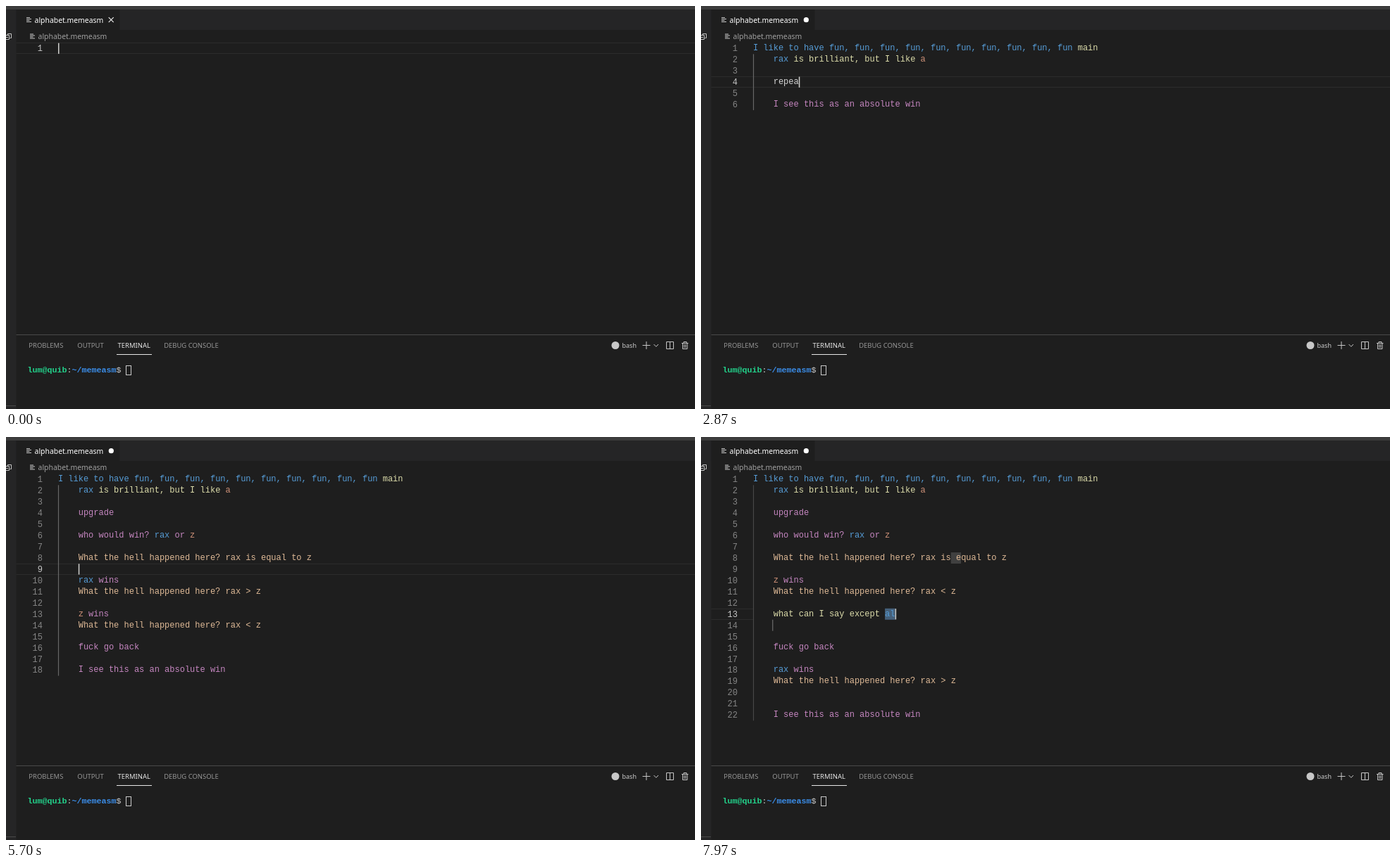
Animation of 978 by 573 pixels, one loop 8 s. Source, as an HTML page:

```html
<!DOCTYPE html>
<html lang="en">
<head>
<meta charset="utf-8">
<title>alphabet.memeasm</title>
<style>
html, body { margin: 0; width: 100%; height: 100%; overflow: hidden; background: #1e1e1e; }
svg { display: block; width: 978px; height: 573px; }
text { white-space: pre; }
.ui { font-family: "Noto Sans", "Open Sans", sans-serif; }
.mono { font-family: "Liberation Mono", monospace; font-size: 12px; }
.tab { font-size: 9.45px; fill: #969696; }
.ico { fill: none; stroke: #c5c5c5; stroke-width: 1; }
</style>
</head>
<body>
<svg viewBox="0 0 978 573">
  <rect width="978" height="573" fill="#1e1e1e"/>
  <rect width="14.5" height="573" fill="#252526"/>
  <rect x="14.5" y="5" width="964" height="29" fill="#252526"/>
  <rect x="14.5" y="5" width="147" height="29" fill="#1e1e1e"/>
  <rect width="978" height="5" fill="#3c3c3c"/>
  <path d="M0 568.5H14" stroke="#4a4a4a"/>
  <path class="ico" d="M2.5 41V39.5H7.5V45.5H5.5M-1 41.5H4.5V47.5H-1M0 44.5H3"/>
  <path id="list" class="ico" d="M29 16.5H34M29 18.5H36M29 20.5H33.5M29 22.5H36"/>
  <use href="#list" x="5" y="23.5"/>
  <g class="ui">
    <text x="40.6" y="23.5" font-size="10.4" fill="#fff">alphabet.memeasm</text>
    <text x="45.6" y="47.4" font-size="10.4" fill="#a0a0a0">alphabet.memeasm</text>
  </g>
  <path id="cross" d="M145.7 16.2L152.7 23.2M152.7 16.2L145.7 23.2" stroke="#e8e8e8" stroke-width="1.2"/>
  <circle id="dot" cx="149.3" cy="19.7" r="3.6" fill="#fff"/>
  <g id="editor" class="mono"></g>
  <path d="M14.5 467.5H978" stroke="#4a4a4a"/>
  <g class="ui tab">
    <text x="32.3" y="485.5">PROBLEMS</text>
    <text x="101.3" y="485.5">OUTPUT</text>
    <text x="158.6" y="485.5" fill="#e7e7e7">TERMINAL</text>
    <text x="224.2" y="485.5">DEBUG CONSOLE</text>
    <text x="874.5" y="485.8" font-size="9" fill="#ccc">bash</text>
  </g>
  <path d="M157 495.5H207" stroke="#e7e7e7"/>
  <circle cx="865" cy="482.5" r="5.5" fill="#c8c8c8"/>
  <path class="ico" d="M909 477V488M903.5 482.5H914.5M919.5 481L922.8 484.3L926 481M937.5 477.5H947.5V487.5H937.5ZM942.5 477.5V487.5"/>
  <path class="ico" d="M959 479.5H968.5M962 479V477.5H966V479M960.5 480V487.5H967V480M962.7 481V486M964.8 481V486"/>
  <text class="mono" y="521.3" style="font-size:11.68px" fill="#ccc"><tspan x="30.5" font-weight="bold" fill="#23d18b">lum@quib</tspan>:<tspan font-weight="bold" fill="#3b8eea">~/memeasm</tspan>$</text>
  <rect x="170.5" y="511.5" width="7" height="13" fill="none" stroke="#ccc"/>
</svg>
<script>
const LOOP = 8000, W = 7.2, H = 15.95;
const X = col => 73.9 + col * W;
const Y = row => 52.4 + (row - 1) * H;
const PAD = '    ';

const COMMANDS = [
  ['Define function', 'I like to have fun'],
  ['Move value', 'is brilliant, but I like'],
  ['Repeat forever', 'upgrade'],
  ['Compare registers', 'who would win'],
  ['Print character', 'what can I say except'],
  ['Add registers', 'units are ready'],
  ['Push to stack', 'stonks'],
  ['Pop from stack', 'not stonks'],
  ['Increment', 'upvote'],
  ['Decrement', 'downvote'],
  ['Comment', 'What the hell happened here?']
];

const TOKENS = [
  ['#deb996', 'What the hell.*'],
  ['#569cd6', 'I like to have[a-z, ]*fun|\\b(?:rax|al)\\b'],
  ['#dcdcaa', '\\bis brilliant, but I like|what can I say except|\\b(?:main?|name)$'],
  ['#c586c0', 'I see this as an absolute win|upgrade|fuck go back|who would win\\?|\\bor\\b|\\bwins'],
  ['#ce9178', '\\b[abz]\\b']
];
const LEXER = new RegExp(TOKENS.map(t => `(${t[1]})`).join('|') + '|(\\S+)', 'g');

// Editing session, recorded as a list of states
const states = [];
let cur = { lines: [''], row: 1, col: 0, marks: [] };
const at = (t, patch) => states.push(cur = { ...cur, ...patch, t });
const put = (row, n, ...added) => {
  const lines = [...cur.lines];
  lines.splice(row - 1, n, ...added);
  return lines;
};
const type = (t, step, word) => [...word].forEach((ch, i) => {
  const s = cur.lines[cur.row - 1], c = cur.col;
  at(t + i * step, { lines: put(cur.row, 1, s.slice(0, c) + ch + s.slice(c)), col: c + 1, sel: null });
});
const popup = (t, first, n, hit, col = cur.col) => at(t, { pop: { row: cur.row, col, first, n, hit } });
const walk = (t, step, rows, col) => rows.forEach((row, i) => at(t + i * step, { row, col }));

const FUN = 'I like to have ' + 'fun, '.repeat(9) + 'fun ';
const move = (a, b) => ({
  lines: put(2, 1, `${PAD}${a} is brilliant, but I like ${b}`),
  marks: [[2, 4, a.length], [2, 30 + a.length, b.length]]
});
const WHAT = PAD + 'What the hell happened here? ';
const compare = (a, b) => ({
  lines: put(6, 9, `${PAD}who would win? ${a} or ${b}`, PAD, `${WHAT}${a} is equal to ${b}`, PAD,
    `${PAD}${a} wins`, `${WHAT}${a} > ${b}`, PAD, `${PAD}${b} wins`, `${WHAT}${a} < ${b}`),
  marks: [[6, 19, a.length], [6, 23 + a.length, b.length]]
});

at(0, {});
// Function
type(170, 40, 'fu');
popup(240, 0, 5, 2, 1);
type(270, 40, 'nc');
popup(340, 0, 1, 4, 1);
at(410, { lines: [FUN + 'name', PAD, PAD, PAD + 'I see this as an absolute win'],
  pop: null, col: 68, sel: [1, 64, 1, 68], marks: [[1, 64, 4]], stop: [2, 4] });
at(530, { lines: put(1, 1, FUN), col: 64, marks: [], sel: null });
type(560, 50, 'main');
at(830, { row: 2, col: 4, stop: null });
// Move
type(970, 40, 'm');
popup(1010, 1, 11, 1);
type(1050, 40, 'ove');
popup(1160, 1, 1, 4, 5);
at(1230, { lines: put(2, 1, '', PAD), pop: null, stop: [3, 4] });
at(1230, { ...move('a', 'b'), col: 5, sel: [2, 4, 2, 5] });
['r', 'ra', 'rax'].forEach((s, i) => at(1340 + i * 60, { ...move(s, 'b'), col: 4 + s.length, sel: null }));
at(1700, { col: 34, sel: [2, 33, 2, 34] });
at(1770, { ...move('rax', 'a'), col: 34, sel: null });
at(2000, { hide: true });
popup(2030, 5, 11, 1);
at(2040, { hide: false });
at(2300, { pop: null });
at(2400, { row: 3, col: 4, marks: [], stop: null });
at(2600, { lines: put(4, 0, PAD), row: 4 });
// Loop
type(2630, 50, 'repeat');
popup(2920, 2, 1, 6);
at(3150, { lines: put(4, 1, PAD + 'upgrade', PAD, PAD, PAD, PAD + 'fuck go back'), pop: null, col: 11 });
at(3370, { row: 6, col: 4 });
// Compare
type(3500, 40, 'compare');
popup(3800, 3, 1, 7);
at(3950, { lines: put(6, 1, ...Array(9).fill('')), pop: null, stop: [9, 4] });
at(3950, { ...compare('a', 'b'), col: 20, sel: [6, 19, 6, 20] });
at(4130, { ...compare('r', 'b'), sel: null });
at(4200, { ...compare('ra', 'b'), col: 21 });
popup(4230, 5, 11, 1);
at(4300, { ...compare('rax', 'b'), col: 22 });
at(4430, { pop: null });
at(4660, { col: 27, sel: [6, 26, 6, 27] });
at(4900, { ...compare('rax', 'z'), sel: null });
popup(4940, 5, 11, 0);
at(5260, { pop: null });
at(5430, { row: 9, col: 4, marks: [], stop: null });
// Move the block below the jump
walk(5770, 80, [9, 10], 0);
[11, 12, 13].forEach((row, i) => at(5970 + i * 70, { row, col: 0, sel: [10, 0, row, 0] }));
const block = cur.lines.slice(9, 12);
at(6230, { lines: put(10, 3), row: 10, sel: null });
walk(6300, 50, [11, 12, 13, 14], 0);
at(6570, { lines: put(14, 0, ...block), row: 17 });
walk(6670, 45, [16, 15, 14, 13], 0);
// Print
at(6970, { col: 16 });
at(7020, { lines: put(14, 0, PAD), row: 14, col: 4 });
at(7080, { row: 13, col: 0 });
at(7130, { lines: put(13, 0, ''), row: 14 });
at(7180, { lines: put(14, 0, ''), row: 15 });
walk(7230, 50, [14, 13], 0);
at(7330, { lines: put(13, 1, PAD), col: 4 });
type(7400, 40, 'p');
popup(7440, 4, 11, 1);
type(7500, 60, 'rin');
popup(7670, 4, 11, 4);
type(7700, 40, 't');
popup(7770, 4, 1, 5, 8);
at(7910, { lines: put(13, 1, PAD + 'what can I say except al', PAD), pop: null, dim: true,
  col: 28, sel: [13, 26, 13, 28], marks: [[13, 26, 2]], stop: [14, 4] });
at(7970, { marks: [...cur.marks, [8, 43 - 4, 2]] });

// Drawing
const esc = s => s.replace(/&/g, '&amp;').replace(/</g, '&lt;');
const rect = (x, y, w, h, fill, more = '') => `<rect x="${x}" y="${y}" width="${w}" height="${h}" fill="${fill}" ${more}/>`;
const text = (x, y, s, fill, more = '') => `<text x="${x}" y="${y}" fill="${fill}" ${more}>${esc(s)}</text>`;

function drawLine(line, i) {
  return [...line.matchAll(LEXER)].map(m => {
    const k = TOKENS.findIndex((_, j) => m[j + 1] !== undefined);
    return text(X(m.index), Y(i + 1) + 10.8, m[0], k < 0 ? '#d4d4d4' : TOKENS[k][0]);
  }).join('');
}

function drawSelection({ sel, lines }) {
  if (!sel) return '';
  const [r1, c1, r2, c2] = sel;
  let out = '';
  for (let r = r1; r <= r2; r++) {
    const from = r === r1 ? c1 : 0, to = r === r2 ? c2 : lines[r - 1].length + 1;
    out += rect(X(from), Y(r), (to - from) * W, H, '#264f78');
  }
  return out;
}

function drawPopup({ row, col, first, n, hit }) {
  const x = X(col) + 0.6, y = Y(row + 1), rowH = 17.6;
  let out = rect(x, y, 361, n * rowH + 1, '#252526', 'stroke="#454545" stroke-width=".8"');
  for (let i = 0; i < n; i++) {
    const [label, detail] = COMMANDS[(first + i) % COMMANDS.length];
    const top = y + i * rowH, base = top + 11.6, on = i === 0;
    if (on) out += rect(x, top + 0.5, 361, rowH, '#094771');
    out += rect(x + 4, top + 3.5, 9.5, 9.5, 'none', 'stroke="#d0d0d0"');
    const k = on ? hit : 0;
    out += `<g font-size="11.75" style="font-size:11.75px">` +
      text(x + 18.2, base, label.slice(0, k), '#1a94f5', 'font-weight="bold"') +
      text(x + 18.2 + k * 7.05, base, label.slice(k), on ? '#fff' : '#d4d4d4') + '</g>';
    if (on) out += text(x + 352.5, base, detail, '#b4c4d2', 'text-anchor="end" style="font-size:10px"');
  }
  return out;
}

function draw(s) {
  const y = Y(s.row), n = s.lines.length;
  const right = s.sel ? 74 : 978;
  let out = `<path d="M14.5 ${Math.round(y) + 0.5}H${right}M14.5 ${Math.round(y + H) - 0.5}H${right}" stroke="#2c2c2c"/>`;
  out += drawSelection(s);
  for (const [r, c, len] of s.marks) out += rect(X(c), Y(r), len * W, H, '#7c7c7c', 'fill-opacity=".36"');
  if (n > 1) out += rect(73.9, Y(2), 1.2, (n - 1) * H, s.dim ? '#484848' : '#686868');
  s.lines.forEach((line, i) => {
    out += text(52, Y(i + 1) + 11.9, String(i + 1), i + 1 === s.row ? '#c6c6c6' : '#858585', 'text-anchor="end"');
    out += drawLine(line, i);
  });
  if (s.stop) out += rect(X(s.stop[1]) - 1.4, Y(s.stop[0]), 1, H, '#7c7c7c');
  if (!s.hide) out += rect(X(s.col) + 0.1, y + 0.3, 1.5, H - 0.6, '#d0d0ce');
  if (s.pop) out += drawPopup(s.pop);
  return out;
}

const $ = id => document.getElementById(id);
const start = performance.now();
let shown;
function frame() {
  const t = Math.max(0, performance.now() - start) % LOOP;
  const s = states.findLast(k => k.t <= t);
  if (s !== shown) {
    shown = s;
    $('editor').innerHTML = draw(s);
    const dirty = s !== states[0];
    $('cross').style.display = dirty ? 'none' : '';
    $('dot').style.display = dirty ? '' : 'none';
  }
  requestAnimationFrame(frame);
}
frame();
</script>
</body>
</html>
```
